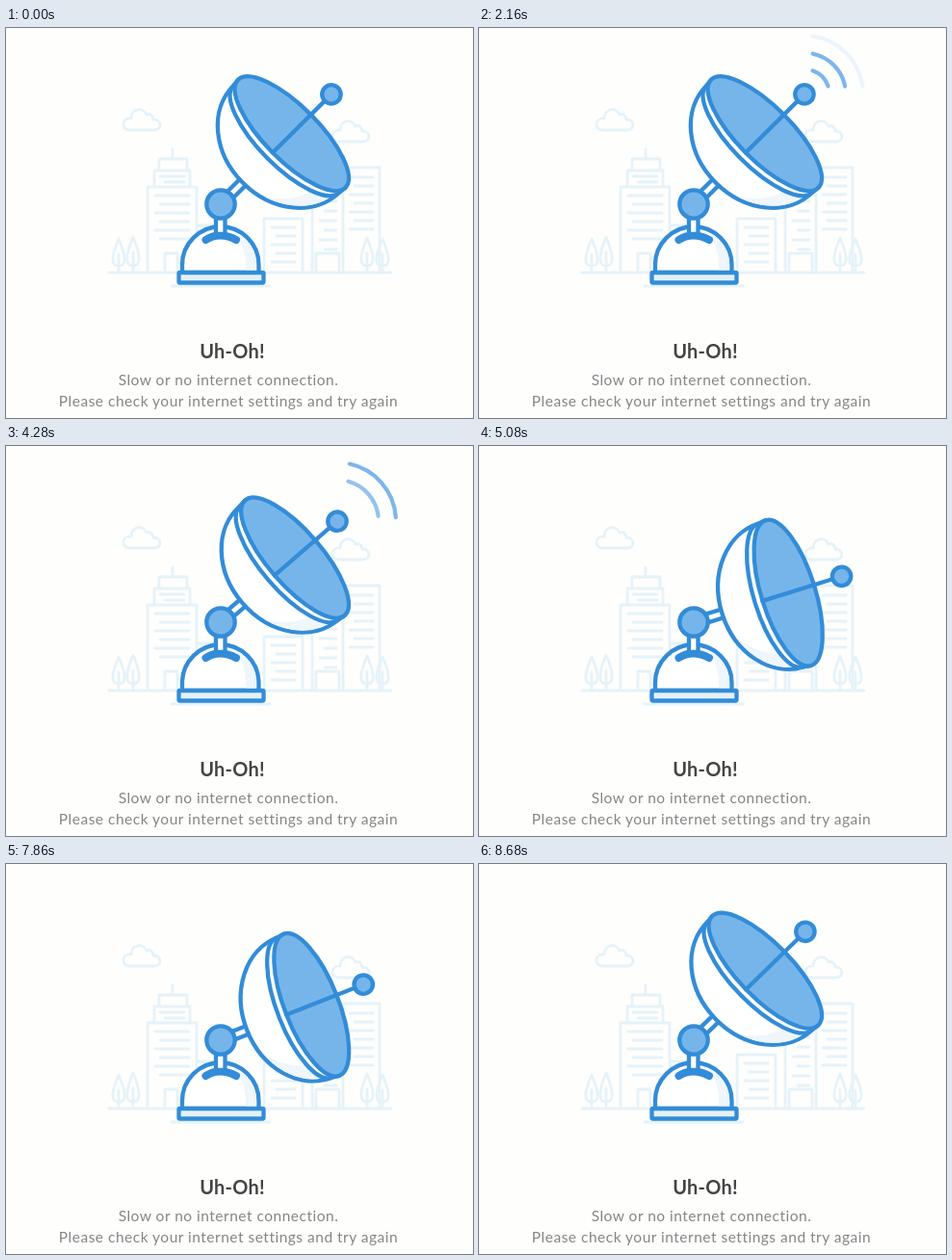
Recreate the animation shown at these times as an HTML page. Size 485 by 405 pixels, loop 8700 ms.

```html
<!DOCTYPE html>
<html lang="en">
<head>
<meta charset="utf-8">
<title>No connection</title>
<style>
  html, body { margin: 0; width: 100%; height: 100%; overflow: hidden; background: #fefefd; }
  svg { display: block; }
  text { font-family: Lato, "Open Sans", sans-serif; text-anchor: middle; }
  .title { font-size: 20px; font-weight: 700; letter-spacing: .2px; fill: #444; }
  .note { font-size: 15.5px; letter-spacing: .5px; fill: #858585; }
  .city { fill: none; stroke: #e5f3f9; stroke-width: 2.8; stroke-linecap: round; stroke-linejoin: round; }
  .line { fill: #fff; stroke: #338cd7; stroke-width: 4.3; stroke-linecap: round; stroke-linejoin: round; }
  .blue { fill: #76b5ea; }
  .pale { fill: #e3f1fb; }
  .shade { fill: #eff6fc; stroke: none; }
  .slot { fill: none; stroke-width: 8; }
  .wave { fill: none; stroke: #7db6ec; stroke-width: 4.2; stroke-linecap: round; }
</style>
</head>
<body>
<svg width="485" height="405" viewBox="0 0 485 405">
  <g class="city">
    <path d="M107 254H400M172 268H274" />
    <path id="cloud" d="M128 106H154C162 106 162 95 153 95C152 89 148 89 146 90C142 81 130 84 130 94C120 93 119 105 128 106Z" />
    <use href="#cloud" x="217" y="12" />
    <path d="M147 254V165H198V254M154 165V148H191V165M159 148V136H188V148M173 136V126M165 254V234H178V254M198 205H216" />
    <path d="M268 254V198H308V254M318 254V150H350M350 145H388V254M350 145V254M322 254V234H346V254" />
    <path id="windows" />
    <g id="trees"></g>
  </g>

  <g class="line">
    <path d="M183 254V246A39.75 39.75 0 0 1 262.5 246V254Z" />
    <path class="shade" d="M260 252V246Q259 222 238 212Q250 228 249 252Z" />
    <rect class="pale" x="179.5" y="254" width="88" height="10.5" rx="1" />
    <path class="slot" d="M207.5 220Q214 215.5 222.5 215.5T239 220" />
    <rect x="218" y="194" width="9.5" height="20" />
  </g>

  <g id="dish" class="line">
    <rect x="8" y="-4.5" width="28" height="9" />
    <path d="M104 -79L96 -78A64 78 0 0 0 96 78L104 79Z" />
    <path class="shade" d="M96 76A62 76 0 0 1 38 27Q57 58 96 60Z" />
    <ellipse cx="96" rx="28" ry="78" />
    <ellipse class="blue" cx="104" rx="28" ry="79" />
    <path d="M76 0H152" />
    <circle class="blue" cx="162" r="9.7" />
    <g id="waves"></g>
  </g>
  <circle class="line blue" cx="223" cy="183" r="14.7" />

  <text class="title" x="235" y="342.5">Uh-Oh!</text>
  <text class="note" x="231" y="371">Slow or no internet connection.</text>
  <text class="note" x="231" y="393">Please check your internet settings and try again</text>
</svg>
<script>
const LOOP = 8700, WAVE = 1550, TURN = 1335;
const JOINT = { x: 223, y: 183 }, UP = -44.8, DOWN = -15, REACH = 125;
const $ = id => document.getElementById(id);

function add(parent, d, cls) {
  const p = document.createElementNS('http://www.w3.org/2000/svg', 'path');
  p.setAttribute('d', d);
  if (cls) p.setAttribute('class', cls);
  parent.append(p);
  return p;
}

// Rows of windows: [left, right, top, bottom, step]
$('windows').setAttribute('d', [
  [155, 190, 174, 226, 9], [160, 185, 154, 160, 6], [276, 300, 207, 246, 9],
  [326, 343, 160, 230, 10], [357, 381, 155, 215, 9]
].map(([l, r, top, bottom, step]) => {
  let d = '';
  for (let y = top, i = 0; y <= bottom; y += step, i++) d += `M${l + i % 2 * 5} ${y}H${r}`;
  return d;
}).join(''));

for (const [x, y] of [[117, 219], [132, 217], [375, 218], [391, 219]])
  add($('trees'), `M${x} ${y}C${x - 5} ${y + 12} ${x - 11} 247 ${x} 247C${x + 11} 247 ${x + 5} ${y + 12} ${x} ${y}ZM${x} ${y + 16}V254`);

const waves = [26, 43, 61].map(r => {
  const half = Math.PI / 4 - Math.asin(8.5 / r);
  const x = 162 + r * Math.cos(half), y = r * Math.sin(half);
  return add($('waves'), `M${x} ${-y}A${r} ${r} 0 0 1 ${x} ${y}`, 'wave');
});

const ramp = (t, start, length) => Math.min(1, Math.max(0, (t - start) / length));
const ease = u => u * u * (3 - 2 * u);
const mix = (a, b, u) => a + (b - a) * u;

function anchor(degrees) {
  const a = degrees * Math.PI / 180;
  return { x: JOINT.x + REACH * Math.cos(a), y: JOINT.y + REACH * Math.sin(a) };
}
const from = anchor(UP), to = anchor(DOWN);

function draw(now) {
  const t = now % LOOP;

  // The dish turns about its anchor while the anchor moves in a straight line
  const tilt = ease(ramp(t, 3975, TURN)) - ease(ramp(t, 7460, TURN));
  const x = mix(from.x, to.x, tilt), y = mix(from.y, to.y, tilt);
  $('dish').setAttribute('transform',
    `translate(${x} ${y}) rotate(${mix(UP, DOWN, tilt)}) translate(${-REACH} 0)`);

  // Three pulses, the last one running on while the dish turns
  const phase = t - Math.min(2, Math.floor(t / WAVE)) * WAVE;
  waves.forEach((wave, i) => {
    const opacity = ramp(phase, 100 + 240 * i, 220) - ramp(phase, 910 + 230 * i, 230);
    wave.setAttribute('opacity', opacity);
  });
}

const begin = performance.now();
function tick() {
  draw(performance.now() - begin);
  requestAnimationFrame(tick);
}
tick();
</script>
</body>
</html>
```
